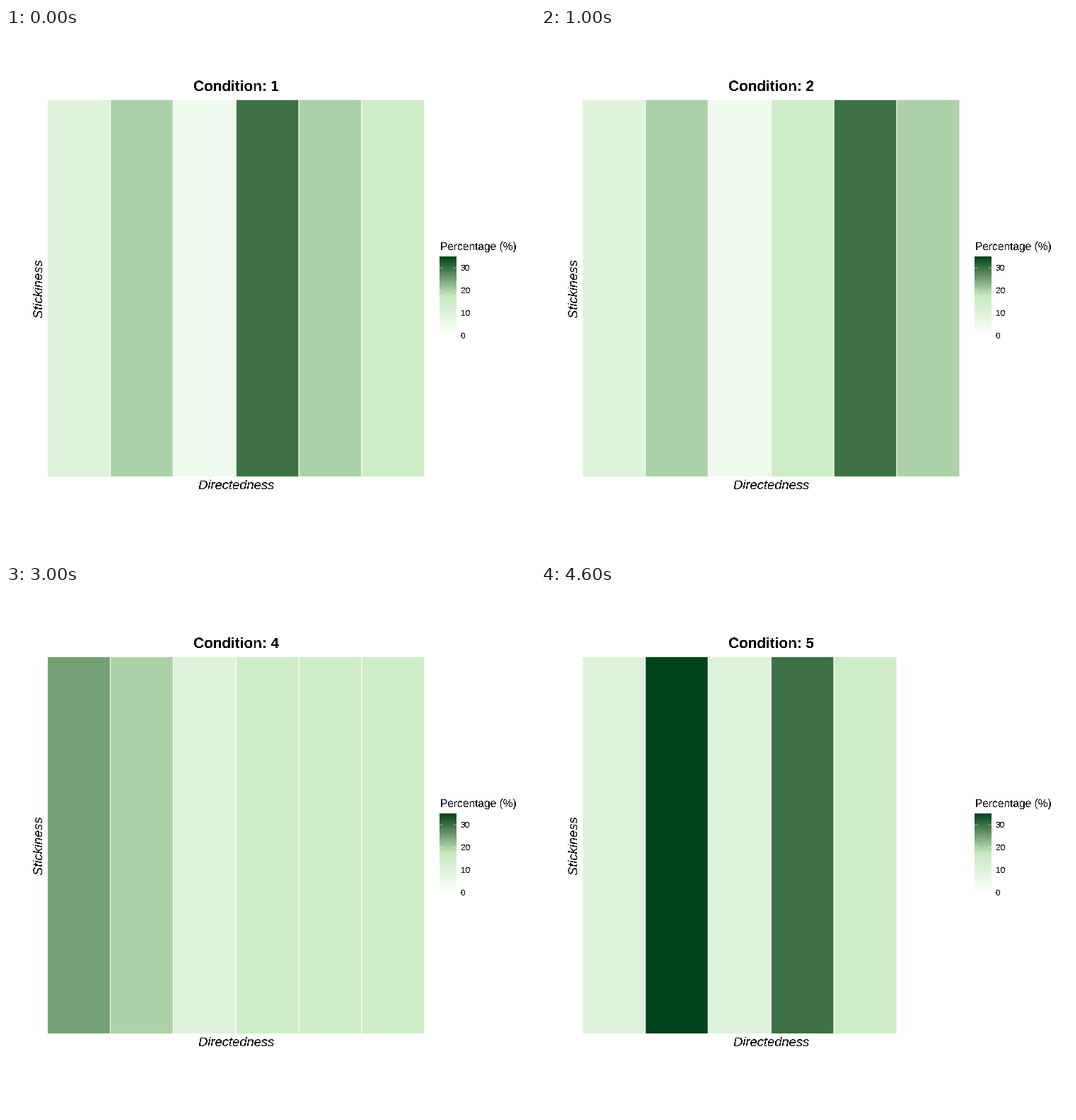
Animation of 748x748 px, one loop 5 s. Source, as a matplotlib script:

```python
import matplotlib.pyplot as plt
import numpy as np
from matplotlib.animation import FuncAnimation
from matplotlib.colors import LinearSegmentedColormap
from matplotlib.patches import Rectangle

SIZE, DPI = 748, 100
PT = 72 / DPI  # points per pixel
LEFT, TOP, SIDE = 58.6, 101.3, 533.4
COLUMNS = 6
TILE = SIDE / COLUMNS
MAX = 35

# Percentage per column, one row per condition
CONDITIONS = [
    [10, 20, 5, 30, 20, 15],
    [10, 20, 5, 15, 30, 20],
    [20, 25, 20, 5, 15, 15],
    [25, 20, 10, 15, 15, 15],
    [10, 35, 10, 30, 15],
]

greens = LinearSegmentedColormap.from_list(
    "greens", [(0, "white"), (0.5, "#c7e9c0"), (30 / MAX, "#3e7146"),
               (1, "#00441b")], N=512)

plt.rcParams.update({"font.family": "Liberation Sans",
                     "text.hinting": "none", "text.antialiased": False})
fig = plt.figure(figsize=(SIZE / DPI, SIZE / DPI), dpi=DPI, facecolor="white")
ax = fig.add_axes([0, 0, 1, 1])


def label(x, y, text, px, **style):
    style = {"ha": "center", "va": "baseline", **style}
    return ax.text(x, y, text, fontsize=px * PT, color="black", **style)


# Heatmap
tiles = [ax.add_patch(Rectangle((LEFT + i * TILE, TOP), TILE, SIDE,
                                ec="white", lw=1.07 * PT, snap=False))
         for i in range(COLUMNS)]
mid_x, mid_y = LEFT + SIDE / 2, TOP + SIDE / 2
title = label(mid_x, 89, "", 20.8, weight="bold")
label(mid_x + 1, 652, "Directedness", 18.4, style="italic")
label(51, mid_y - 0.5, "Stickiness", 18.4, style="italic", rotation=90,
      rotation_mode="anchor")

# Legend
x0, x1, y0, y1 = 613, 637, 435, 323
tick = (x1 - x0) / 5
label(613.8, 314, "Percentage (%)", 15.5, ha="left")
ax.imshow(np.linspace(MAX, 0, y0 - y1)[:, None], cmap=greens, vmin=0, vmax=MAX,
          extent=(x0, x1, y0, y1), aspect="auto", interpolation="nearest")
for value in range(0, MAX, 10):
    y = y0 + (y1 - y0) * value / MAX
    label(643, y + 4, str(value), 12, ha="left")
    ax.hlines([y, y], [x0, x1 - tick], [x0 + tick, x1], color="white",
              lw=0.5 * PT, snap=False)

ax.set(xlim=(0, SIZE), ylim=(SIZE, 0))
ax.axis("off")


def draw(i):
    shares = CONDITIONS[i]
    title.set_text(f"Condition: {i + 1}")
    for k, tile in enumerate(tiles):
        tile.set_visible(k < len(shares))
        if k < len(shares):
            tile.set_facecolor(greens(shares[k] / MAX))
    return [title, *tiles]


anim = FuncAnimation(fig, draw, frames=len(CONDITIONS), interval=1000,
                     repeat=True, repeat_delay=0)
plt.show()
```
